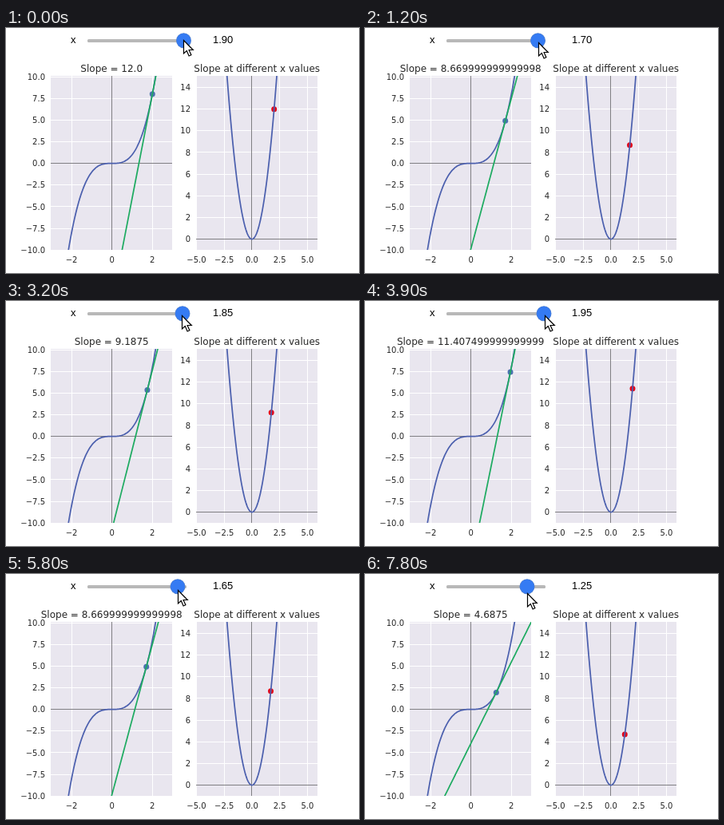
Animation of 442x307 px, one loop 8 s. Source, as an HTML page with a canvas:

```html
<!DOCTYPE html>
<html lang="en">
<head>
<meta charset="utf-8">
<title>Slope of a cubic</title>
<style>
  html, body { margin: 0; width: 100%; height: 100%; overflow: hidden; background: #fff; }
  canvas { display: block; }
</style>
</head>
<body>
<canvas id="stage" width="442" height="307"></canvas>
<script>
const ctx = document.getElementById('stage').getContext('2d');
const LOOP = 8000, TICK = 100, PLOT_LAG = 200;
const TOP = 60, BOTTOM = 278;
const INK = '#262626', CURVE = '#4c60ae', AXIS = '#807f83';
const TICK_FONT = '10px "DejaVu Sans", sans-serif';
const TITLE_FONT = '12px "DejaVu Sans", sans-serif';
const SLIDER_FONT = '13px "Liberation Sans", Arial, sans-serif';

// Key points of the drag, as [time, slider value] and [time, pointer height]
const dragKeys = [
  [-100, 1.98], [0, 1.895], [1000, 1.705], [2500, 1.72], [2600, 1.74], [3100, 1.77],
  [3200, 1.83], [3500, 1.87], [3700, 1.97], [4700, 1.97], [4800, 1.915],
  [6600, 1.46], [6900, 1.44], [7000, 1.36], [7400, 1.33], [7600, 1.25]
];
const heightKeys = [[0, 15], [1000, 18], [4700, 18], [7600, 24]];

function interpolate(keys, t) {
  const next = keys.findIndex(key => key[0] > t);
  if (next < 0) return keys.at(-1)[1];
  if (next === 0) return keys[0][1];
  const [t0, v0] = keys[next - 1], [t1, v1] = keys[next];
  return v0 + (v1 - v0) * (t - t0) / (t1 - t0);
}

const dragAt = t => interpolate(dragKeys, t);
const sliderAt = t => Math.round(dragAt(t) * 20) / 20;
const sliderX = value => 165.5 + 30 * value;

const range = (from, to, step) =>
  Array.from({ length: Math.round((to - from) / step) + 1 }, (_, i) => from + i * step);
const label = (v, digits) => v.toFixed(digits).replace('-', '\u2212');
const decimal = v => Number.isInteger(v) ? v.toFixed(1) : String(v);
const cube = x => x ** 3;
const slope = x => 3 * (x * x);

const cubic = {
  left: 56, right: 208, titleX: 132.2,
  px: x => 132.7 + 25.3 * x, py: y => 169.6 - 10.86 * y,
  xTicks: range(-2, 2, 2), xDigits: 0,
  yTicks: range(-10, 10, 2.5), yDigits: 1
};
const parabola = {
  left: 238, right: 390, titleX: 314.2,
  px: x => 307.9 + 13.9 * x, py: y => 264.6 - 13.58 * y,
  xTicks: range(-5, 5, 2.5), xDigits: 1,
  yTicks: range(0, 14, 2), yDigits: 0
};

function text(string, x, y, font, align, color = INK) {
  ctx.font = font;
  ctx.textAlign = align;
  ctx.fillStyle = color;
  ctx.fillText(string, x, y);
}

function circle(x, y, r, color) {
  ctx.fillStyle = color;
  ctx.beginPath();
  ctx.arc(x, y, r, 0, 2 * Math.PI);
  ctx.fill();
}

function line(points, color, width) {
  ctx.strokeStyle = color;
  ctx.lineWidth = width;
  ctx.beginPath();
  points.forEach(([x, y]) => ctx.lineTo(x, y));
  ctx.stroke();
}

// Straight lines across the axes sit on whole pixels
function ruleX(axes, value, color) {
  const x = Math.floor(axes.px(value)) + 0.5;
  line([[x, TOP], [x, BOTTOM]], color, 1);
}

function ruleY(axes, value, color) {
  const y = Math.floor(axes.py(value)) + 0.5;
  line([[axes.left, y], [axes.right, y]], color, 1);
}

function graph(axes, f, color) {
  line(range(-3, 3, 0.05).map(x => [axes.px(x), axes.py(f(x))]), color, 1.75);
}

function drawAxes(axes, title, dot, graphs) {
  const { left, right, px, py } = axes;
  ctx.save();
  ctx.beginPath();
  ctx.rect(left, TOP, right - left, BOTTOM - TOP);
  ctx.clip();
  ctx.fillStyle = '#e9e6ef';
  ctx.fillRect(left, TOP, right - left, BOTTOM - TOP);
  axes.xTicks.forEach(x => ruleX(axes, x, '#fff'));
  axes.yTicks.forEach(y => ruleY(axes, y, '#fff'));
  circle(px(dot.x), py(dot.y), 3.5, dot.color);
  ruleY(axes, 0, AXIS);
  ruleX(axes, 0, AXIS);
  graphs.forEach(([f, color]) => graph(axes, f, color));
  ctx.restore();
  axes.xTicks.forEach(x => text(label(x, axes.xDigits), px(x), 294, TICK_FONT, 'center'));
  axes.yTicks.forEach(y => text(label(y, axes.yDigits), left - 7, py(y) + 3.65, TICK_FONT, 'right'));
  text(title, axes.titleX, 55, TITLE_FONT, 'center');
}

function drawSlider(value) {
  text('x', 81, 19, SLIDER_FONT, 'left', '#000');
  text(value.toFixed(2), 259, 19, SLIDER_FONT, 'left', '#000');
  ctx.fillStyle = '#b8b8b8';
  ctx.beginPath();
  ctx.roundRect(102, 14, 124, 4, 1.5);
  ctx.fill();
  circle(sliderX(value), 15.7, 9.5, '#5580c8');
  circle(sliderX(value), 15.7, 8.9, '#357bf3');
}

function drawPointer(x, y) {
  ctx.save();
  ctx.translate(x + 0.5, y + 0.5);
  ctx.beginPath();
  [[0, 0], [0, 16.5], [3.8, 13], [6.6, 19.5], [9.4, 18.3], [6.6, 12], [11.8, 12]]
    .forEach(([px, py]) => ctx.lineTo(px, py));
  ctx.closePath();
  ctx.fillStyle = '#fff';
  ctx.fill();
  ctx.strokeStyle = '#000';
  ctx.lineWidth = 1.2;
  ctx.stroke();
  ctx.restore();
}

function draw(time) {
  const t = Math.floor(time / TICK) * TICK;
  const x = sliderAt(t - PLOT_LAG);
  const y = cube(x), m = slope(x);

  ctx.fillStyle = '#fff';
  ctx.fillRect(0, 0, 442, 307);
  drawAxes(cubic, 'Slope = ' + decimal(m), { x, y, color: '#4c72b0' },
    [[cube, CURVE], [u => y + m * (u - x), '#1fab62']]);
  drawAxes(parabola, 'Slope at different x values', { x, y: m, color: '#e3061a' },
    [[slope, CURVE]]);
  drawSlider(sliderAt(t));
  drawPointer(Math.round(sliderX(dragAt(t))), Math.round(interpolate(heightKeys, t)));
}

const start = performance.now();
function tick() {
  draw((performance.now() - start) % LOOP);
  requestAnimationFrame(tick);
}
tick();
</script>
</body>
</html>
```
